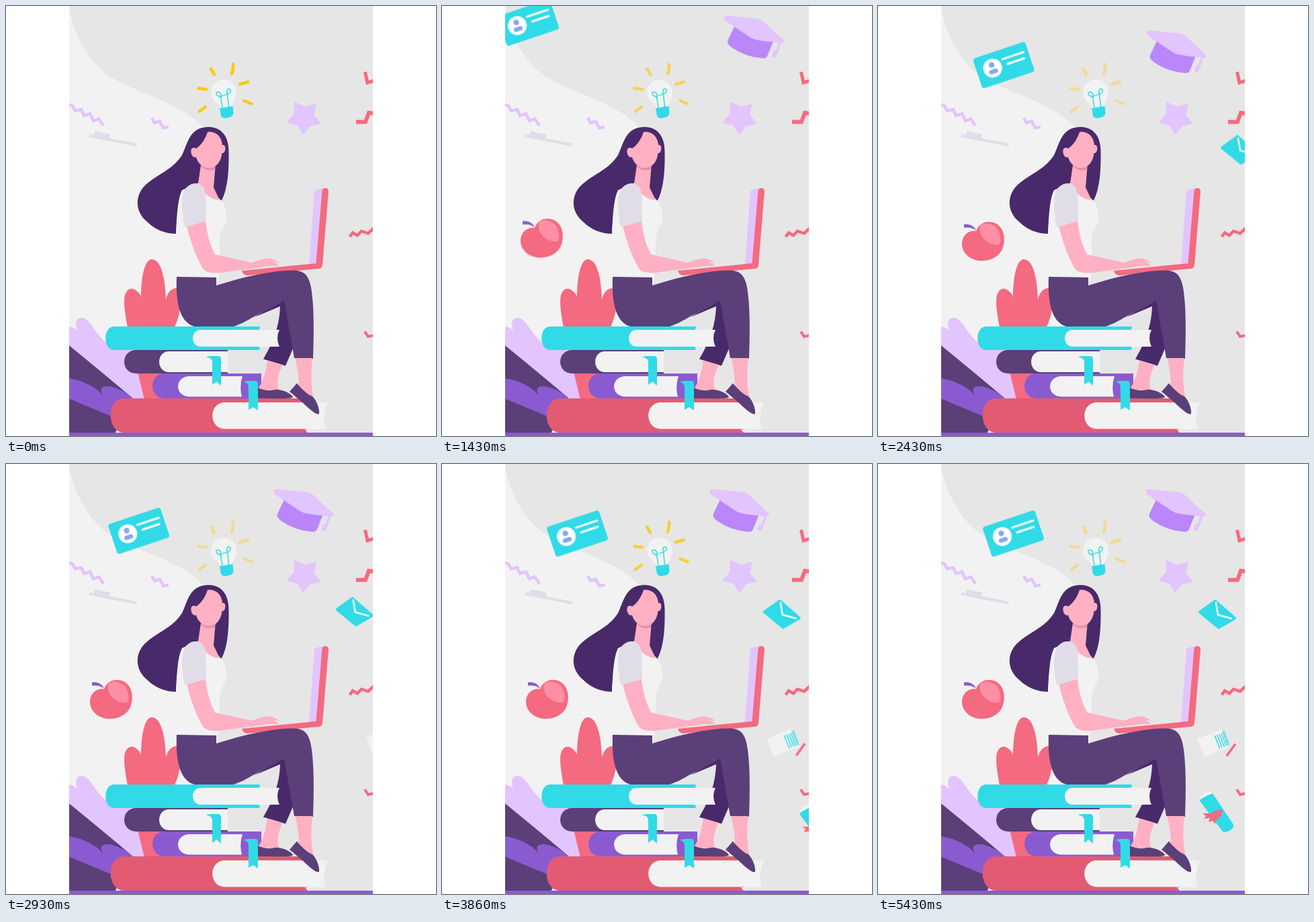
An HTML page that plays this animation: 640 by 640 pixels, repeating every 5.5 s.

```html
<!DOCTYPE html>
<html lang="en">
<head>
<meta charset="utf-8">
<title>Studying on books</title>
<style>
  html, body { margin: 0; width: 100%; height: 100%; overflow: hidden; background: #fff; }
  svg { display: block; width: 100vw; height: 100vh; }

  .light { fill: #f2f2f2; }
  .lilac { fill: #e2c4ff; }
  .violet { fill: #8a5bd0; }
  .plum { fill: #5b3f79; }
  .dark { fill: #482a6b; }
  .red { fill: #f46a80; }
  .cyan { fill: #30dbe7; }
  .skin { fill: #ffb0c3; }
  .mist { fill: #e0dde8; }
  .line { fill: none; }
  .line.lilac { stroke: #e2c4ff; }
  .line.red { stroke: #f46a80; }
  .line.cyan { stroke: #30dbe7; }
  .line.white { stroke: #fff; }
  .round { stroke-linecap: round; stroke-linejoin: round; }

  /* Cubic ease-out for the sliding items */
  .fly { animation: 5.5s cubic-bezier(.333, 1, .667, 1) infinite; }
  .cap { animation-name: cap; }
  .apple { animation-name: apple; }
  .card { animation-name: card; }
  .mail { animation-name: mail; }
  .note { animation-name: note; animation-timing-function: cubic-bezier(.25, 1, .5, 1); }
  .scroll-x { animation-name: scroll-x; }
  .scroll-y { animation-name: scroll-y; animation-timing-function: cubic-bezier(.33, .5, .67, .95); }
  .rays { animation: glow 5.5s linear infinite; }

  @keyframes cap {
    0% { transform: translate(147px, -159px); }
    54.9%, 100% { transform: translate(0, 0); }
  }
  @keyframes apple {
    0% { transform: translate(-115px, -68px); }
    44.2%, 100% { transform: translate(0, 0); }
  }
  @keyframes card {
    0%, 15.6% { transform: translate(-139px, -150px); }
    69.5%, 100% { transform: translate(0, 0); }
  }
  @keyframes mail {
    0%, 32.7% { transform: translate(76px, -22px); }
    80.1%, 100% { transform: translate(0, 0); }
  }
  @keyframes note {
    0%, 49.1% { transform: translate(89px, -5px); }
    95.6%, 100% { transform: translate(0, 0); }
  }
  @keyframes scroll-x {
    0%, 63.6% { transform: translateX(97px); }
    100% { transform: translateX(0); }
  }
  @keyframes scroll-y {
    0%, 63.6% { transform: translateY(27.7px); }
    97.3%, 100% { transform: translateY(0); }
  }
  @keyframes glow {
    0% { opacity: 1; }
    17% { opacity: .8; }
    35% { opacity: .48; }
    45% { opacity: .35; }
    53.3% { opacity: .38; }
    67%, 70% { opacity: .8; }
    80.5% { opacity: .6; }
    98.7%, 100% { opacity: .38; }
  }
</style>
</head>
<body>
<svg viewBox="0 0 640 640">
  <clipPath id="page"><rect x="94" width="452" height="640"/></clipPath>
  <g clip-path="url(#page)">
    <rect x="93" width="454" height="640" fill="#e6e6e6"/>
    <path class="light" d="M93.8 0C99 40 120 79 150 102C190 130 258 141 294 181C330 220 325 330 300 400V640H93Z"/>

    <!-- Confetti -->
    <g class="line lilac" stroke-width="4.5">
      <path d="M92 146L99 149L103 156L112 154L116 163L125 160.500L130 171L138 168L145 178"/>
      <path d="M217 166.500L221 174L229 171.500L234 181.500L242 180"/>
    </g>
    <g class="line red">
      <path stroke-width="5" d="M534.500 98L538 114L548 111"/>
      <path stroke-width="6" d="M521 172.500H535L540 159L548 160"/>
      <path stroke-width="4.500" d="M511.500 343.500L516 337.500L523 341.500L529 335L539 338.500L548 330"/>
      <path stroke-width="4" d="M534 484.500L539 492L548 490"/>
    </g>
    <path class="mist" d="M132 186.500L155.500 191L154.500 197L194 204.500V209L123 195L124.500 190.500L130.500 192Z"/>
    <path class="lilac round" stroke="#e2c4ff" stroke-width="2" d="M430 144L444.500 151L460.500 147L457 162.500L467 174.500L452 178L442.500 190L435 177.500L419 173L429.500 161.500Z"/>

    <!-- Light bulb -->
    <g class="rays round" fill="none" stroke="#ffc907" stroke-width="4.500">
      <path d="M305 93.500L310 102M338 86.500Q338.500 94 336 101M348 116.500L360 113M354.500 141L365.500 145.500M296.500 150.500L288 157M286.500 122.500L298 124"/>
    </g>
    <path class="light" d="M324 110C335 110 343 118 343 129C343 139 337 142 337 150L319 152C317 144 305 141 305 129C305 118 313 110 324 110Z"/>
    <path class="cyan" d="M318 152L337.500 149L338.500 159Q338 165 331 166L326 167Q320 166.500 319.500 161Z"/>
    <path class="line cyan" stroke-width="1.500" d="M322 151L319.500 135C312 134 311 127 316 128C321 129 320 134 319.500 135C324 132 328 132 329.500 131C336 129 335 122 331 123.500C327 125 329 129 329.500 131L331.500 150"/>

    <!-- Plants -->
    <path class="lilac" d="M93 477C98 477 102 480 106 483C101 470 106 464 113 464C125 465 131 485 148 500L184 505L208 584H93Z"/>
    <path class="red" d="M206 585C198 550 176 470 176 440C176 421 186 418 193 423C199 427 200 430 201 433C201 405 206 377 217 377C230 377 237 402 238 437C240 428 245 420 254 420C266 424 260 460 250 480L240 585Z"/>
    <path class="plum" d="M93 504.500Q145 547 190 585L160 640H93Z"/>
    <path class="violet" d="M93 554C115 557 134 567 145 580C138 570 142 566 152 566C165 567 181 576 190 586L160 600V612L93 584Z"/>

    <!-- Hair and face -->
    <path class="dark" d="M301 180C323 180 332 197 331.500 218C332 250 329 275 320.500 290L307 275L285 290L262 300C255 312 253.500 325 253 339C238 339 222 333 211 322C192 307 191 283 207 267C225 250 247 245 262 222C271 203 273 181 301 180Z"/>
    <path class="light" d="M253 404C252 330 254 290 262 274L287 263C296 280 305 289 320 289C327 297 330 313 327 322C320 337 317 342 318 360L316 405L313 420H253Z"/>
    <path class="skin" d="M291 230L312 234L309 270L318 289C307 289 295 281 286 264Z"/>
    <path fill="#e58fa4" d="M290 234C296 241 305 242 311 238V243C303 246 295 244 290 238Z"/>
    <path class="skin" d="M300 187.500C312 186 321 194 322 207C326 205 328 212 325 217C324 219 322 219 321.500 219C320 233 312 241 302 241C292 241 285 233 283 225C277 227 274 218 276 213C278 210 281 211 283 212C291 207 297 197 300 187.500Z"/>

    <!-- Laptop and arm -->
    <path class="lilac" d="M459 277Q459 274 462 273.500L472 271L466 384L451 385Z"/>
    <path class="red" d="M351 394L461.500 383L470.500 275Q471.500 271 475 271Q480 271 480 276L471 386Q470 391 465 391L359 401Q353 401 351 394Z"/>
    <path class="skin" d="M269 328L297 319C299 340 304 357 311.500 370L366 382Q380 376 391 375.500Q401 377 406 382L396 381Q405 383 405.500 387L390 387Q380 389 370 390L318 397Q297 399 292 389C281 370 275 350 269 328Z"/>
    <path class="mist" d="M266 329C261 305 260 283 267 272C276 261 290 262 295 272C299 282 297 301 298 320Z"/>

    <!-- Trousers -->
    <path class="dark" d="M370 463L414 436L430 505L427 510L416 535.500L383 525.500C395 505 407 480 408 447Z"/>
    <path class="plum" d="M254 403L313 404V416C350 404 392 394 426 393.500C445 393 452 402 455 425C459 455 458 490 457 525L429 524L414 438C397 449 383 455 366 464C356 470 346 475 336 478H284C262 474 252 450 254 403Z"/>

    <!-- Book stack -->
    <path class="violet" d="M236 547H380V584H236C212 584 212 547 236 547Z"/>
    <path class="light" d="M274 551H352Q347 566 351 581.500H274C250 581.500 250 551 274 551Z"/>
    <path class="plum" d="M194 512H330V547H194C170 547 170 512 194 512Z"/>
    <path class="light" d="M243 514H330V545H243C223 545 223 514 243 514Z"/>
    <path class="cyan" d="M161 477H378L374 495L378 512H161C144 512 144 477 161 477Z"/>
    <path class="light" d="M290 482H407Q401 494 407 507H290C274 507 274 482 290 482Z"/>
    <path fill="#e25b73" d="M176 584H450V635H176C149 635 149 584 176 584Z"/>
    <path class="light" d="M326 590H479Q470 610 476 630H445L449 635H452L450 629.500H326C301 629.500 301 590 326 590Z"/>
    <path class="cyan" d="M298 523Q300 521 306 521H316Q320 521 320 526V565L313.500 559L307 564V529Q306 523 298 523Z"/>

    <!-- Feet -->
    <path class="skin" d="M389 527.500L412 534C405 548 402 560 407 573L375 570C384 556 386 545 389 527.500Z"/>
    <path class="skin" d="M430.500 524H456C454 545 453 560 458 586L436 568C436 552 434 540 430.500 524Z"/>
    <path class="plum" d="M371 567C382 571 390 574 400 571C413 570 426 578 427 582C426 585 410 584 371 584Z"/>
    <path class="plum" d="M433 561.500C440 570 448 578 456 581C463 588 467 600 466 607C460 610 445 592 422 574Z"/>
    <path class="cyan" d="M354 560Q356 558 362 558H371Q375 558 375 563V602L368 597L361 601V567Q360 560 354 560Z"/>
    <rect class="violet" x="93" y="635" width="454" height="5"/>

    <!-- Sliding items -->
    <g class="fly cap">
      <path fill="#ba86fa" d="M414 53L404 74Q402 80 410 85Q430 99 456 101Q462 101 463 97L472 75Z"/>
      <path class="lilac" d="M398 40Q399 37 404 37.500L448 42Q453 43 457 46L487 74Q489 78 483 78Q465 77 446 73.500Q440 72 436 69L400 45Z"/>
      <path class="line lilac" stroke-width="3.500" d="M482 76L476 94"/>
      <path class="lilac" d="M473 89L479 91L475 100L469 98Z"/>
    </g>

    <g class="fly apple">
      <path class="red" d="M146 335C150 322 165 318 176 324C190 332 190 352 184 364C176 377 162 380 150 379C135 377 124 366 125 352C126 340 136 333 146 335Z"/>
      <path fill="#ff8fa4" d="M153 326C160 322 172 324 178 332C184 342 183 352 180 355C170 357 158 350 153 340C151 334 151 329 153 326Z"/>
      <path class="violet" d="M128 325C136 323.500 143 327 146 334C141 330 135 329 128 330Z"/>
    </g>

    <g class="fly card">
      <g transform="translate(201.500 103.500) rotate(-18.500)">
        <rect class="cyan" x="-41" y="-23.500" width="82" height="47" rx="4"/>
        <circle cx="-17" cy="-1" r="14" fill="#fff"/>
        <g fill="#86a8f5">
          <circle cx="-17" cy="-6" r="4.200"/>
          <rect x="-24" y="1" width="13.500" height="6.500" rx="3"/>
        </g>
        <path class="line white round" stroke-width="3.200" d="M1 -9H34M6 .2H32"/>
      </g>
    </g>

    <g class="fly mail">
      <path class="cyan round" stroke="#30dbe7" stroke-width="4" d="M479 220.500L502 204L531 229.500L507 243.500Z"/>
      <path class="line white round" stroke-width="2.500" d="M503 206.500L506 224.500L526 230"/>
    </g>

    <g class="fly note">
      <path class="light" d="M475 409.500L511 395L522.500 421L486 436Z"/>
      <path class="line cyan" stroke-width="1.500" d="M501 404L509 424M504.500 403L512 422M508 402L515.500 421M511 401L518.500 420"/>
      <path class="line cyan" stroke-width="4" stroke-dasharray="1.500 1" d="M514 398L521.500 418"/>
      <path class="line red" stroke-width="3.500" d="M532 416.500L519 434.500"/>
    </g>

    <g class="fly scroll-x">
      <g class="fly scroll-y">
        <path class="cyan" d="M478 500L497 489L528 535Q532 541 523 546Q515 549.500 512 546Z"/>
        <path class="light" d="M477 499.500Q484 490 493 486L498 490.500Q488 493 478 500.500Z"/>
        <path class="red" d="M483 520L496 520L502 516L513 514L511 523L506 528L503 529L502 536L498 531L492 533L494 527L485 528L488 524Z"/>
      </g>
    </g>
  </g>
</svg>
</body>
</html>
```
